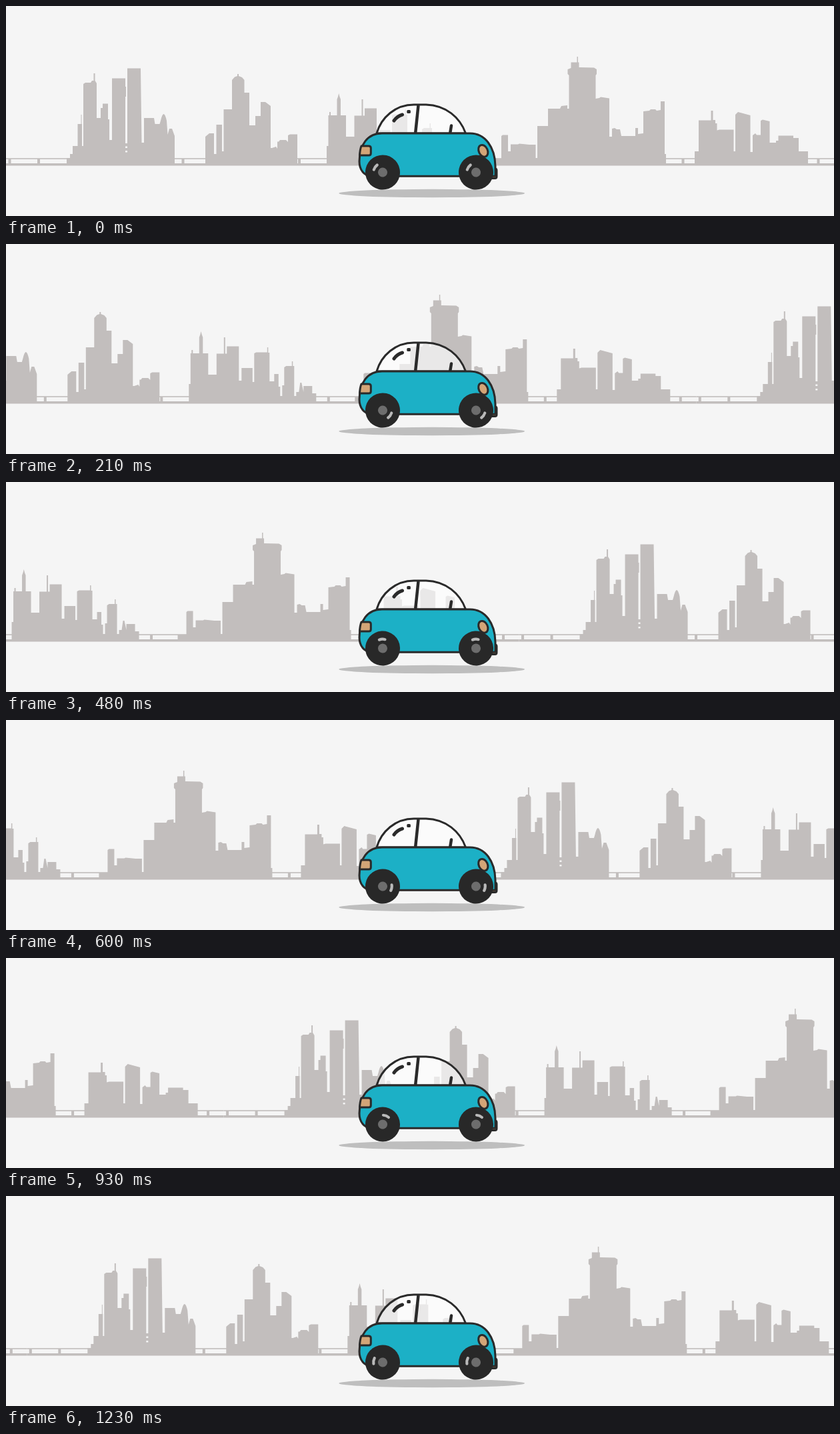
Animation, 1242 px wide and 315 px high, one loop 1260 ms. Source, as an HTML page:

```html
<!DOCTYPE html>
<html lang="en">
<head>
<meta charset="utf-8">
<title>Car in the city</title>
<style>
  html, body { margin: 0; width: 100%; height: 100%; overflow: hidden; background: #f5f5f5; }
  svg { display: block; width: 1242px; height: 315px; }
</style>
</head>
<body>
<svg viewBox="0 0 1242 315" xmlns="http://www.w3.org/2000/svg">
  <defs>
    <g id="city" fill="#c2bebd">
      <path fill="#cbc8c7" d="M0 228H1242V230H0Z"/>
      <path d="M0 236H1242V239.5H0Z"/>
      <path id="posts"/>
      <!-- twin towers -->
      <path d="M91 239V228H96V222H100V210H107.500V177H112.500V163H113.500V177H114V210H116V117L119 115H127L129 112H131.500V101H133.500V112L136 116V168H142V153H145V146.500H153V170H155V201H159V108.500H179V121H180V136H179V206H182V93.500H202L203.500 205H207V168H222L223.500 177H230.500L232 172Q236.500 152 241 172L242.500 193L245 184H249L253 195V239Z"/>
      <path fill="#f5f5f5" d="M179 210.500H182V213H179ZM179 217H182V219.500H179Z"/>
      <!-- domed tower -->
      <path d="M299 239V196L305 191H312V222H315.500V178H324V218H326.500V155H339V111L343 106.500L347 105V102H349V105L354 107L357.500 111V130H365V179H374V165H382V144H389L397 150V213H399L405 211L407 214V203.500H409L411 201H420L423 204V194L426 192.500H437V239Z"/>
      <!-- minaret block -->
      <path d="M481 239V210H483.500V164H485V159H487V164H496.500V140L498 136L499.200 131L500.500 136L502 140V164H510V196H522.500V164.500H533.500V140H535.500V164.500H538V153.500H556V205H560V186H576.500V207H579V164L582 162.500H598.500V155H600V163H602V206H609V195H615.500V214H618V228H621V212H624V185L627 183H635.500V176H637V183H639V228H642V222H646L648 208H650L653 222V213H666V224H672V239Z"/>
      <!-- capped tower -->
      <path d="M730 239V229H743V195L745 193.500H753V218H757V207.500H768L770 206.500L785 208H794.500V228H797V180H813V154H831L833 150L842 149V154H844.500V104L842.500 102V95L847.500 93V84.500H856.500V76H858V84.500H859.500V92L882 92.500L886 95V102L884.500 104V139L890 138L892 136.500L905 138.500V196H909V184L913 183L916 185H921L923 195H944V183H948V192L956 191V158L965 157L967 155H974L976 157L982 156V143H988V222H990V239Z"/>
      <!-- low blocks -->
      <path d="M1033 239V218H1039V171.500H1057.500V157H1060.500V171H1064V176H1066.500V186.500L1070 185.500H1091.500V218H1094V163L1098 159L1116.500 164V219H1120V194L1124 191L1126 193.500H1132V172L1135 170.500L1145.500 173V205H1155V202H1158.500V194.500H1181V198H1189V218H1203V239Z"/>
    </g>
    <g id="wheel">
      <circle r="26" fill="#282828"/>
      <circle r="7" fill="#6d6d6d"/>
      <path d="M13.100 -4.300A13.800 13.800 0 0 1 13.100 4.300" fill="none" stroke="#b9b9b9" stroke-width="4.200" stroke-linecap="round"/>
    </g>
  </defs>

  <rect width="1242" height="315" fill="#f5f5f5"/>
  <use href="#city" class="tile"/>
  <use href="#city" class="tile"/>

  <ellipse cx="638.700" cy="281" rx="139.500" ry="6.200" fill="#bebebe"/>

  <g stroke="#2a2a2a" stroke-width="3" stroke-linejoin="round">
    <path d="M556 191C563 167 584 148 612 148H630C660 149 681 167 689.500 191Z" fill="#fff" fill-opacity=".65"/>
    <g fill="none" stroke-width="4.500">
      <path d="M618.500 149L614.200 190"/>
      <path d="M668 179.500L666.300 190" stroke-linecap="round"/>
      <path d="M582 172Q587 165 594.500 163" stroke-width="5" stroke-linecap="round"/>
    </g>
    <rect x="601.300" y="156" width="5.600" height="5" rx="1.500" fill="#2a2a2a" stroke="none"/>
    <rect x="726" y="244" width="10" height="14.500" rx="2.500" fill="#d3a577"/>
    <path d="M564 191H696C719 191 733.500 212 734 240V255.300H550C537 255 530 246 530 233C530.500 208 542 191 564 191Z" fill="#1cb0c6"/>
    <path d="M533 210H544Q547.300 210 547.300 213V221Q547.300 224 544 224H530.500Q531 215 533 210Z" fill="#d3a577"/>
    <ellipse cx="715.800" cy="217.300" rx="6.600" ry="9.300" transform="rotate(-25 715.800 217.300)" fill="#d3a577"/>
  </g>

  <use href="#wheel" class="wheel" data-x="565"/>
  <use href="#wheel" class="wheel" data-x="705"/>
</svg>
<script>
  const LOOP = 1260, STEP = 30, WIDTH = 1242;
  const SPEED = 0.9843;   // px per ms
  const TURNS = 3, START = 215;
  const tiles = document.querySelectorAll('.tile');
  const wheels = document.querySelectorAll('.wheel');

  document.getElementById('posts').setAttribute('d',
    [5.5, 49, 265.5, 440, 690.5, 1015.500, 1218.500]
      .map(x => `M${x - 2} 229h4v8h-4z`).join(''));

  function draw(ms) {
    const t = Math.floor((ms % LOOP + 0.01) / STEP) * STEP % LOOP;
    const shift = t * SPEED;
    tiles.forEach((tile, i) =>
      tile.setAttribute('transform', `translate(${i * WIDTH - shift} 0)`));
    const angle = START + 360 * TURNS * t / LOOP;
    wheels.forEach(w =>
      w.setAttribute('transform', `translate(${w.dataset.x} 249.500) rotate(${angle})`));
  }

  const begin = performance.now();
  function tick() {
    draw(performance.now() - begin);
    requestAnimationFrame(tick);
  }
  draw(0);
  requestAnimationFrame(tick);
</script>
</body>
</html>
```
